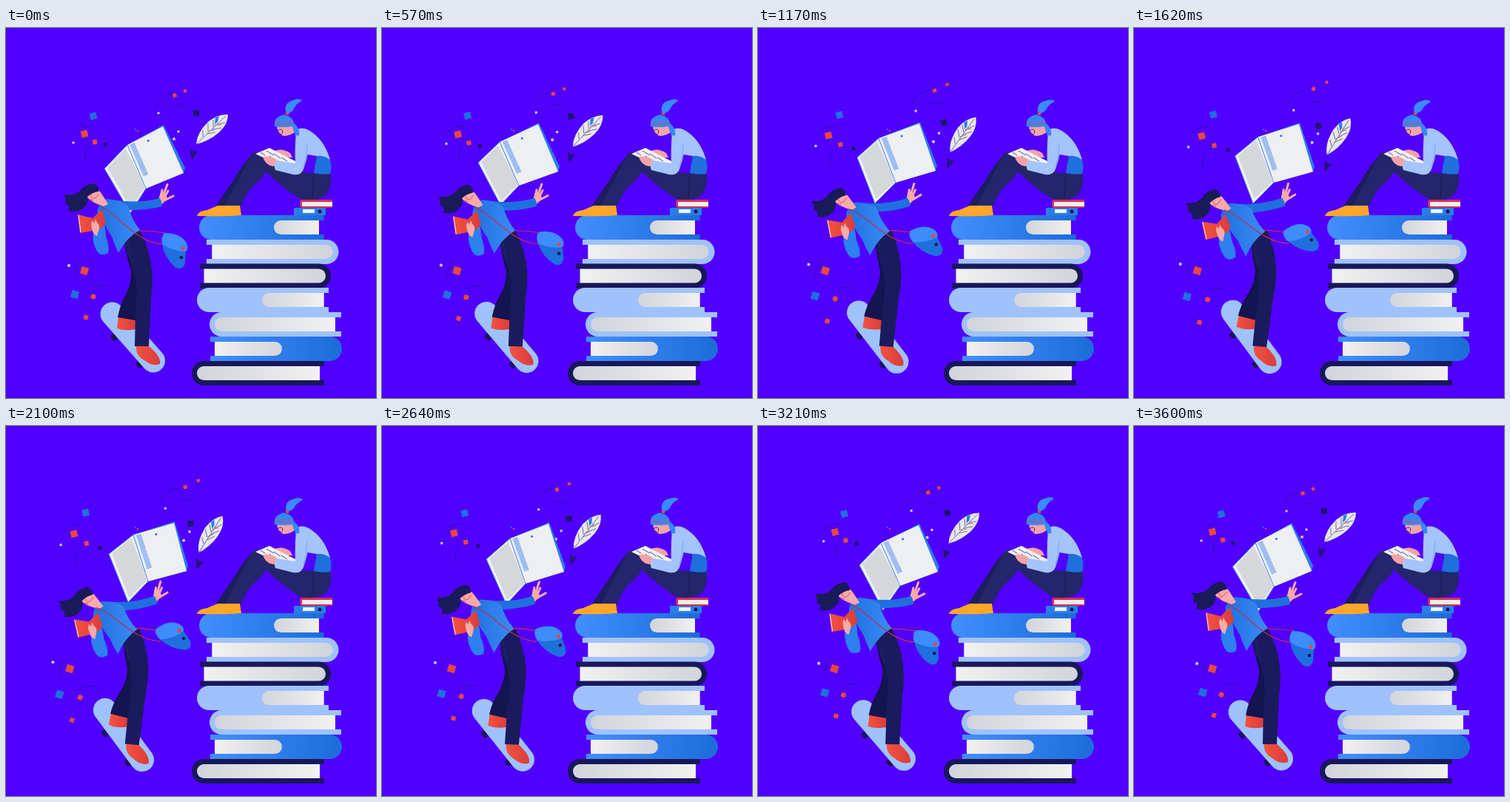
Recreate the animation shown at these times as an HTML page. Size 500 px wide and 500 px high, loop 3.63 s.

```html
<!DOCTYPE html>
<html lang="en">
<head>
<meta charset="utf-8">
<title>Reading and riding</title>
<style>
html, body { margin: 0; width: 100%; height: 100%; overflow: hidden; background: #5000ff }
svg { display: block; width: 100vw; height: 100vh }
</style>
</head>
<body>
<svg viewBox="0 0 500 500">
  <defs>
    <linearGradient id="blue"><stop stop-color="#428eff"/><stop offset="1" stop-color="#1c6cd8"/></linearGradient>
    <linearGradient id="shirt"><stop stop-color="#1f70dc"/><stop offset="1" stop-color="#3c8bf8"/></linearGradient>
    <linearGradient id="paperR"><stop stop-color="#f1f1f1"/><stop offset="1" stop-color="#d2d4da"/></linearGradient>
    <linearGradient id="paperL"><stop stop-color="#d2d4da"/><stop offset="1" stop-color="#f1f1f1"/></linearGradient>
    <linearGradient id="red"><stop stop-color="#f4523f"/><stop offset="1" stop-color="#d93d3c"/></linearGradient>
  </defs>
  <g id="stack"></g>

  <path fill="#2a7ee6" d="M389 243h43v10h-43z"/>
  <path fill="#eef2fb" d="M401 245h16v5h-16z"/>
  <circle cx="424" cy="248" r="2.5" fill="#17175a"/>
  <path fill="#d6304f" d="M441 232H400Q397 232 397 237.500T400 243H441V241H401V235H441z"/>
  <path fill="#f1ecee" d="M400 235h41v6h-41z"/>

  <g id="reader">
    <path fill="#1b1d5e" d="M335 168Q318 186 308 205L283 241H306Q330 212 350 190L345 172z"/>
    <path fill="#23266b" d="M333 169Q340 165 348 173Q360 187 385 194L413 196L438 195Q442 213 432 226Q416 236 396 230Q368 211 351 194Q345 206 333 214Q322 228 318 240H296Q314 206 333 169z"/>
    <path fill="none" stroke="#15174f" d="M414 200Q418 214 413 229"/>
    <path fill="#ffa62b" d="M258 254Q260 247 272 246L286 240H316L318 253Q300 255 258 254z"/>
    <path fill="#1f70dc" d="M420 172Q431 170 438 178Q441 189 438 197Q428 199 416 196z"/>
    <path fill="#a3c4fc" d="M391 141Q396 132 409 138Q430 150 438 178Q430 172 420 173L408 171L394 165z"/>
    <path fill="#f3a3a8" d="M361 167Q372 161 384 169L387 175L378 175z"/>
    <path fill="#f1f1f1" d="M337 170L356 162L393 181L389 186L372 187z"/>
    <path fill="none" stroke="#23266b" stroke-width=".8" d="M344 168l6 4M352 166l10 6M362 170l9 6M372 175l8 5M356 173l7 5"/>
    <path fill="#f3a3a8" d="M347 174Q358 172 367 179L364 187Q351 187 347 174z"/>
    <path fill="#a3c4fc" d="M392 141Q390 165 391 183L366 179Q361 186 364 192L388 198Q400 200 403 188Q409 170 411 148z"/>
    <path fill="none" stroke="#6f9df0" stroke-width=".8" d="M407 156Q407 173 402 188"/>
    <path fill="#f3a3a8" d="M366 130Q366 142 375 146Q385 146 392 139L389 129z"/>
    <path fill="#3786f7" d="M363 133Q361 120 376 117Q388 120 389 129Q398 135 396 145Q390 148 387 133Q375 135 363 133z"/>
    <path fill="none" stroke="#e8473f" stroke-width="1.300" d="M364 127Q376 132 388 128"/>
    <path fill="none" stroke="#23266b" stroke-width=".9" d="M367 139Q372 135 374 139Q374 143 371 144"/>
    <g id="ponytail">
      <path fill="#3a8bff" d="M379 116Q374 102 387 98Q396 94 400 98Q391 103 389 110Q385 115 379 116z"/>
      <path fill="none" stroke="#23266b" stroke-width=".7" d="M378 101Q381 94 389 95"/>
      <path stroke="#e8473f" stroke-width="3" d="M378 115l4 2"/>
    </g>
  </g>

  <g id="arcs" fill="none" stroke="#2c12a8"></g>
  <g id="confetti"></g>
  <g id="feather">
    <path fill="#e6e7ec" d="M257 157Q258 141 274 126Q287 116 300 117Q300 130 288 141Q274 153 257 157z"/>
    <path fill="#2a7ee6" d="M283 121l5-2l-2 8l-4 3z"/>
    <path fill="none" stroke="#55587f" stroke-width=".8" d="M257 157L297 119M266 147v-9M273 140v-11M280 134v-10M272 143l11-2M279 137l12-2M286 130l10-2"/>
    <path stroke="#c9505c" stroke-width=".8" d="M282 131l9 0M274 139l8-1"/>
  </g>
  <path id="heart" fill="#23157c" d="M249 163l4 4l5-2q-1 8-7 13q-2-8-2-15z"/>

  <g id="flyingBook">
    <path id="cover" fill="#2a7ee6"/>
    <path id="pageR" fill="#eeeff1"/>
    <path id="coverL" fill="#eff1f5" stroke="#3c86f2"/>
    <path id="pageL" fill="#d5d7db"/>
    <path id="print" fill="none" stroke="#6ea0f5" stroke-width="7" stroke-dasharray="1.300 .8"/>
    <circle id="mark" r="1.500" fill="#2a6fe0"/>
  </g>

  <g id="legs">
    <path stroke="#17175a" stroke-width="7" stroke-linecap="round" d="M145 417l2 2M179 454l2 2"/>
    <path stroke="#9fc2fd" stroke-width="32" stroke-linecap="round" d="M143.500 386.500L199 449.500"/>
    <path fill="url(#red)" d="M152 389L175 393V407Q160 410 150 406z"/>
    <path fill="url(#red)" d="M176 428L193 430Q210 444 208 454Q198 458 187 449Q174 442 176 428z"/>
    <path fill="#131450" d="M161 278L182 290L185 340Q180 365 175 395L151 391Q154 374 162 360Q170 345 169 328Q158 295 161 278z"/>
    <path fill="#1a1b5c" d="M160 290Q164 273 180 272Q194 298 197 325Q199 342 196 365L193 430L174 430L175 380Q179 345 172 325Q160 300 160 290z"/>
    <path fill="none" stroke="#3a3f94" stroke-dasharray="1 3" d="M165 284Q164 300 172 318"/>
  </g>
  <g id="bag">
    <path fill="#1f70dc" d="M211 292Q214 310 228 323Q238 329 242 318L243 300z"/>
    <path fill="#3d8dff" d="M214 277Q235 277 243 289Q248 297 243 302Q226 302 211 292Q209 283 214 277z"/>
    <circle cx="239" cy="298" r="2.500" fill="#e8473f"/>
    <path fill="#17175a" d="M235 308h4v4h-4z"/>
  </g>
  <g id="upperBody">
    <path fill="#f7aaa9" d="M206 232L209 222L214 221L218 230L211 238z"/>
    <path fill="none" stroke="#f7aaa9" stroke-width="3" stroke-linecap="round" d="M209 229L211 219M211 230L218 211.500M213 231L219 220M212 234L226 227"/>
    <path fill="#1f70dc" d="M145 232Q178 238 208 230Q211 235 211 241Q190 247 155 246z"/>
    <path fill="url(#shirt)" d="M137 231Q152 232 165 240Q170 260 181 273Q163 283 152 304Q147 294 143 282Q130 262 124 245Q128 233 137 231z"/>
    <path fill="#2d80ee" d="M125 243Q135 262 135 282Q140 294 138 304Q127 310 122 300Q116 287 118 277z"/>
    <path fill="#f7aaa9" d="M109 222Q120 215 127 221Q134 231 138 238L132 241Q116 236 110 229z"/>
    <path fill="#191a5a" d="M119 210Q107 211 101 219Q93 228 78 225Q82 232 80 237Q88 240 84 247Q98 251 107 241Q112 235 110 228Q117 222 125 221Q126 214 119 210z"/>
    <path fill="none" stroke="#d93d3c" stroke-width=".8" d="M115 225a4 4 0 1 0 8 2M113 231l5 2M123 227l3-3"/>
    <path fill="url(#red)" d="M97 252L117 257L130 245L135 264Q128 273 118 274L100 277z"/>
    <path fill="none" stroke="#f3e6ea" d="M98 253L101 276"/>
    <path fill="#f7aaa9" d="M115 264L117 260L119 264L121 258L123 263Q127 266 126 271L123 281Q116 279 115 264z"/>
  </g>
  <g fill="none" stroke="#c52c50" stroke-width="1.200"><path id="strap"/><path id="strapTop"/></g>
</svg>
<script>
const PERIOD = 3630;
const $ = id => document.getElementById(id);
const NAVY = '#17185a', LIGHT = '#9fc2fd', RED = '#e8473f', BLUE = '#1f70dc', PALE = '#c9d3fb', DARK = '#1d1670';

// Horizontal bar with one rounded end (side: 'L' or 'R').
function bar(x1, x2, y, h, side, fill) {
  const r = h / 2;
  const d = side === 'L'
    ? `M${x2} ${y}H${x1 + r}a${r} ${r} 0 0 0 0 ${h}H${x2}z`
    : `M${x1} ${y}H${x2 - r}a${r} ${r} 0 0 1 0 ${h}H${x1}z`;
  return `<path d="${d}" fill="${fill}"/>`;
}
function closedBook([x1, x2, y, side, p1, p2, fill]) {
  const gap = side === 'L' ? [p2, x2] : [x1, p1];
  return bar(x1, x2, y, 33, side, fill) +
    `<path d="M${gap[0]} ${y + 7}H${gap[1]}v19H${gap[0]}z" fill="#5000ff"/>` +
    bar(p1, p2, y + 7, 19, side, `url(#paper${side})`);
}
$('stack').innerHTML = [
  [261, 429.500, 253, 'L', 362, 423, 'url(#blue)'],
  [271, 449.500, 286, 'R', 278.500, 441.500, LIGHT],
  [262, 439, 318.500, 'R', 267.500, 432, NAVY],
  [258, 436, 351, 'L', 346, 429.500, LIGHT],
  [275, 453, 384, 'L', 282, 445, LIGHT],
  [276, 454, 417, 'R', 282, 373, 'url(#blue)'],
  [251, 430, 450, 'L', 258, 424, NAVY]
].map(closedBook).join('');

// x, y, drift x, drift y, size, colour
const bits = [
  [118, 119, -11, -2, 9, BLUE], [106, 143, -15, 3, 9, RED], [120, 154, -12, 5, 6, RED],
  [91, 155, -18, 6, 3, PALE], [134, 158, -7, 7, 5, DARK], [228, 91, 15, -9, 5, RED],
  [242, 85, 19, -12, 4, RED], [206, 115, 10, -4, 3, PALE], [257, 115, -8, 18, 8, DARK],
  [233, 140, 16, 3, 3, PALE], [227, 150, 14, 5, 3.500, PALE], [93, 360, -22, 3, 10, BLUE],
  [106, 328, -21, 0, 10, RED], [85, 321, -23, -2, 3.500, PALE], [118, 363, -19, 4, 7, RED, 1],
  [108, 391, -20, 7, 6, RED], [175, 137, 0, 0, 2, BLUE], [178, 139, 0, 0, 2, RED]
];
$('confetti').innerHTML = bits.map(([, , , , s, c, round]) =>
  `<rect x="${-s / 2}" y="${-s / 2}" width="${s}" height="${s}" rx="${round ? s / 2 : 0}" fill="${c}"/>`).join('');

const arcs = [
  ['M90 143Q98 131 118 132', -14, 1], ['M108 177Q104 165 112 155', -14, 13],
  ['M94 339Q92 323 102 314', -22, -2], ['M117 352Q127 345 140 349', -18, 4],
  ['M202 107Q208 92 226 88', 7, -5], ['M225 106Q235 102 245 108', 10, -5]
];
$('arcs').innerHTML = arcs.map(a => `<path d="${a[0]}"/>`).join('');

// Corners of the flying book as x, y pairs: spine top, right top, right bottom,
// spine bottom, left top, left bottom.
const times = [0, 570, 1170, 2100, 2640, 3210];
const poses = [
  [164, 158, 212, 133, 240, 196, 189, 217, 133, 190, 168, 250],
  [159, 154, 211, 130, 238, 194, 185, 213, 130, 182, 160, 239],
  [163, 149, 218, 129, 240, 193, 186, 209, 134, 175, 158, 237],
  [172, 147, 227, 131, 244, 196, 192, 210, 139, 173, 165, 238],
  [173, 152, 225, 132, 246, 197, 194, 213, 141, 180, 168, 241],
  [166, 158, 217, 134, 243, 197, 192, 216, 137, 188, 169, 249]
];
// Smooth periodic interpolation between the poses.
function poseAt(t) {
  const n = times.length;
  const time = i => times[(i + n) % n] + Math.floor(i / n) * PERIOD;
  const pose = i => poses[(i + n) % n];
  const i = times.findLastIndex(k => k <= t);
  const h = time(i + 1) - time(i), u = (t - time(i)) / h;
  return pose(i).map((a, k) => {
    const slope = j => (pose(j + 1)[k] - pose(j - 1)[k]) / (time(j + 1) - time(j - 1)) * h;
    const b = pose(i + 1)[k], m = slope(i), q = slope(i + 1);
    return a + u * (m + u * (3 * (b - a) - 2 * m - q + u * (2 * (a - b) + m + q)));
  });
}
const mix = (a, b, u) => [a[0] + (b[0] - a[0]) * u, a[1] + (b[1] - a[1]) * u];
const shift = (a, x, y) => [a[0] + x, a[1] + y];
const poly = (id, ...pts) => $(id).setAttribute('d', 'M' + pts.join('L') + 'z');
function drawBook(t) {
  const v = poseAt(t);
  const [a, b, c, d, e, f] = [0, 2, 4, 6, 8, 10].map(i => [v[i], v[i + 1]]);
  const inPage = (x, y) => mix(mix(a, b, x), mix(d, c, x), y);
  const inLeft = (x, y) => mix(mix(e, a, x), mix(f, d, x), y);
  poly('cover', a, shift(b, 1, -2), shift(c, 2, -7), c, d);
  poly('pageR', a, b, c, d);
  poly('coverL', e, a, d, f);
  poly('pageL', inLeft(.1, .03), inLeft(.9, .03), inLeft(1, .97), inLeft(.1, .95));
  $('print').setAttribute('d', `M${inPage(.12, .03)}L${inPage(.13, .75)}`);
  const [x, y] = inPage(.52, .12);
  $('mark').setAttribute('transform', `translate(${x} ${y})`);
}

function place(el, x, y, angle = 0, cx = 0, cy = 0) {
  el.setAttribute('transform', `translate(${x} ${y}) rotate(${angle} ${cx} ${cy})`);
}
function draw() {
  const t = performance.now() % PERIOD;
  const p = (1 - Math.cos(2 * Math.PI * t / PERIOD)) / 2;
  drawBook(t);
  bits.forEach(([x, y, dx, dy], i) =>
    place($('confetti').children[i], x + dx * p, y + dy * p, y > 300 ? 17 : -14));
  arcs.forEach(([, dx, dy], i) => place($('arcs').children[i], dx * p, dy * p));
  place($('feather'), -2 * p, 10 * p, -15 * p, 278.500, 137);
  place($('heart'), 8 * p, 17 * p, 12 * p, 253, 170);
  place($('ponytail'), 0, 0, 5 * p, 380, 116);
  place($('legs'), 0, 0, 5 * p, 172, 268);
  place($('bag'), 0, 2 * p, -40 * p, 202, 293);
  place($('upperBody'), 0, 0, -5.400 * p, 200, 315);
  $('strap').setAttribute('d', `M${127 - 6 * p} ${241 + 5 * p}C${150 - 4 * p} ${250 + 2 * p} ${175 - 4 * p} 290 ${211 - 2 * p} ${292 - p}`);
  $('strapTop').setAttribute('d', `M${179 - 4 * p} ${274 - p}Q${198 - 8 * p} 274 ${216 - 13 * p} ${277 - p}`);
  requestAnimationFrame(draw);
}
draw();
</script>
</body>
</html>
```
